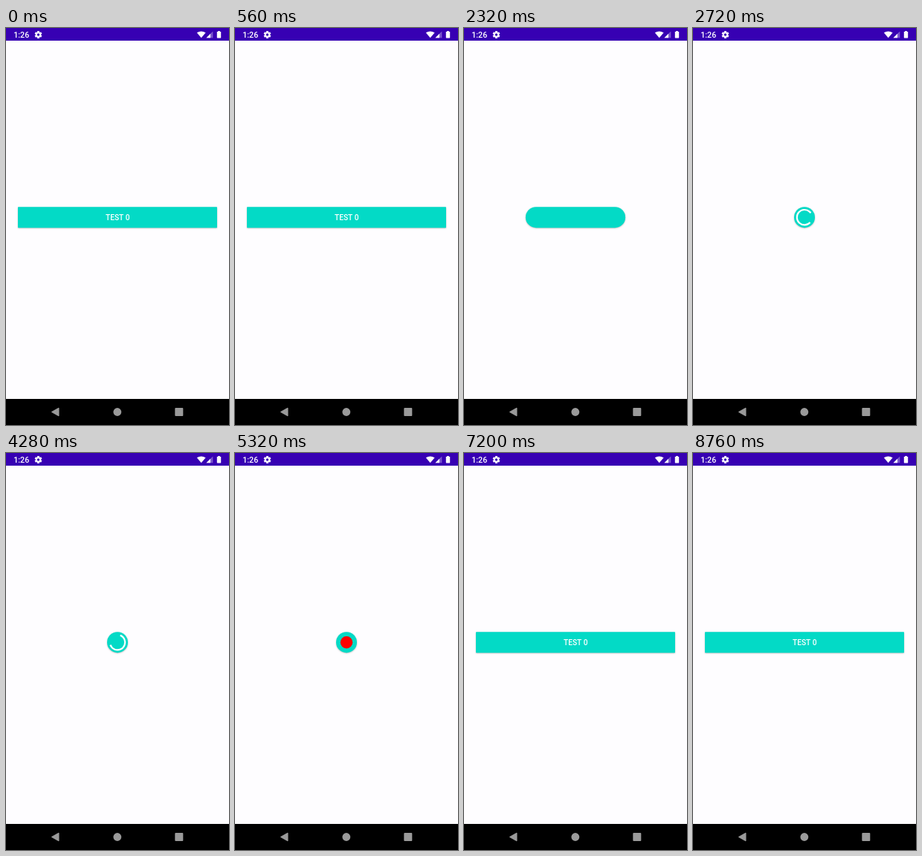
These frames come from a looping animation (300 by 533 pixels, 8.96 s). An HTML page with a canvas:

```html
<!DOCTYPE html>
<html lang="en">
<head>
<meta charset="utf-8">
<title>Loading button</title>
<style>
  html, body { margin: 0; width: 100%; height: 100%; overflow: hidden; background: #fefdff; }
  canvas { display: block; width: 300px; height: 533px; }
</style>
</head>
<body>
<canvas id="stage"></canvas>
<script>
const W = 300, H = 533, LOOP = 8960;
const CX = 150, CY = 254.2, SIZE = 28, FULL = 268;
const TEAL = '#03dac6';
const MORPH = 300, SHRINK = 2160, SPIN = 2487, DONE = 5160, RESTORE = 6290, LABEL = 6600;

const canvas = document.getElementById('stage');
const ctx = canvas.getContext('2d');
const dpr = window.devicePixelRatio || 1;
canvas.width = W * dpr;
canvas.height = H * dpr;
ctx.scale(dpr, dpr);

const clamp = x => Math.max(0, Math.min(1, x));
const ease = x => (1 - Math.cos(Math.PI * clamp(x))) / 2;
const rad = deg => deg * Math.PI / 180;

function rect(x, y, w, h, color) {
  ctx.fillStyle = color;
  ctx.fillRect(x, y, w, h);
}

function disc(x, y, r, color) {
  ctx.fillStyle = color;
  ctx.beginPath();
  ctx.arc(x, y, r, 0, Math.PI * 2);
  ctx.fill();
}

function poly(points, color) {
  ctx.fillStyle = color;
  ctx.beginPath();
  points.forEach(([x, y]) => ctx.lineTo(x, y));
  ctx.closePath();
  ctx.fill();
}

function roundRect(x, y, w, h, r) {
  ctx.beginPath();
  ctx.roundRect(x, y, w, h, r);
  ctx.fill();
}

function text(str, x, y, size, align) {
  ctx.font = `500 ${size}px Roboto, sans-serif`;
  ctx.textAlign = align;
  ctx.fillStyle = '#fff';
  ctx.fillText(str, x, y);
}

function gear(x, y) {
  const bar = '#3700b3';
  ctx.save();
  ctx.translate(x, y);
  for (let i = 0; i < 6; i++) {
    ctx.rotate(Math.PI / 3);
    rect(-1.4, -4.9, 2.8, 3, '#fff');
  }
  ctx.restore();
  disc(x, y, 3.7, '#fff');
  disc(x, y, 1.7, bar);
}

function statusBar() {
  rect(0, 0, W, 17, '#3700b3');
  text('1:26', 10.2, 12.9, 10.7, 'left');
  gear(43.5, 9);

  ctx.fillStyle = '#fff';
  ctx.beginPath();
  ctx.moveTo(262.7, 13.2);
  ctx.lineTo(256.8, 6.3);
  ctx.quadraticCurveTo(262.7, 2.6, 268.6, 6.3);
  ctx.closePath();
  ctx.fill();

  poly([[269.5, 13.2], [278.3, 13.2], [278.3, 4.6]], 'rgba(255,255,255,.35)');
  poly([[269.5, 13.2], [275, 13.2], [275, 7.8]], '#fff');

  rect(285.2, 4, 2.6, 1.5, '#fff');
  roundRect(283.8, 4.9, 5.4, 8.5, 0.6);
}

function navBar() {
  const grey = '#9a9a9a';
  rect(0, 498, W, H - 498, '#000');
  poly([[61.4, 515.5], [71, 510.1], [71, 520.9]], grey);
  ctx.strokeStyle = grey;
  ctx.lineWidth = 1;
  ctx.lineJoin = 'round';
  ctx.stroke();
  disc(149.8, 515.5, 5.4, grey);
  ctx.fillStyle = grey;
  roundRect(227.3, 510, 11, 11, 1);
}

// Arc that grows, then shrinks from its tail, while the whole ring turns.
function spinner(ms) {
  const gap = 50, half = 347, turn = 1526;
  const step = Math.floor(ms / half);
  const left = 1 - ms / half + step;
  const swept = (360 - 2 * gap) * (1 - left * left);
  let start = ms / turn * 360 - 13 - 2 * gap * Math.floor(step / 2);
  let sweep = swept + gap;
  if (step % 2) {
    start += swept;
    sweep = 360 - swept - gap;
  }
  ctx.strokeStyle = '#fff';
  ctx.lineWidth = 2.2;
  ctx.beginPath();
  ctx.arc(CX, CY, 10.2, rad(start), rad(start + sweep));
  ctx.stroke();
}

function button(t) {
  const shrunk = ease((t - SHRINK) / MORPH) - ease((t - RESTORE) / MORPH);
  const w = FULL + (SIZE - FULL) * shrunk;
  const r = Math.min(SIZE / 2, 0.7 + SIZE * shrunk);

  ctx.save();
  ctx.shadowColor = 'rgba(0,0,0,.25)';
  ctx.shadowBlur = 2 * dpr;
  ctx.shadowOffsetY = 0.7 * dpr;
  ctx.fillStyle = TEAL;
  roundRect(CX - w / 2, CY - SIZE / 2, w, SIZE, r);
  ctx.restore();

  if (t < SHRINK || t >= LABEL) text('TEST 0', 150.3, 258.2, 10.2, 'center');
  if (t >= SPIN && t < DONE) spinner(t - SPIN);
  if (t >= DONE && t < RESTORE - 10) {
    disc(CX, CY, SIZE / 2 * ease((t - DONE) / 290), '#f00');
  }
}

function draw(now) {
  rect(0, 0, W, H, '#fefdff');
  statusBar();
  navBar();
  button(now % LOOP);
}

const begin = performance.now();
function frame() {
  draw(performance.now() - begin);
  requestAnimationFrame(frame);
}
frame();
</script>
</body>
</html>
```
